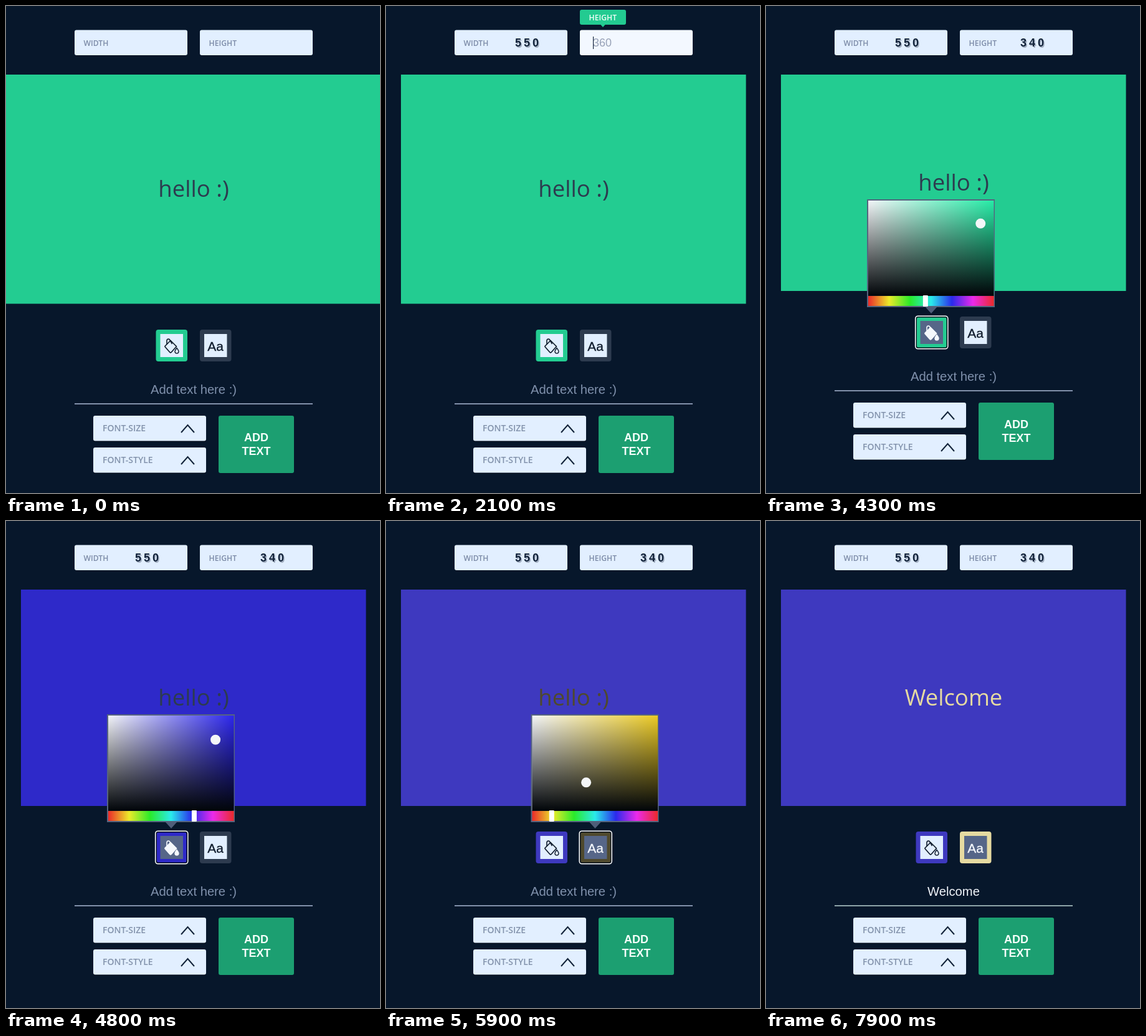
An HTML page that plays this animation: 600 px wide and 781 px high, repeating every 8000 ms.

```html
<!DOCTYPE html>
<html lang="en">
<head>
<meta charset="utf-8">
<title>Image editor demo</title>
<style>
  html, body { margin: 0; width: 100%; height: 100%; overflow: hidden; background: #07172b; }
  svg { display: block; width: 100vw; height: 100vh; }
  .ui { font-family: "Open Sans", "Noto Sans", sans-serif; font-weight: 600; }
  .arial { font-family: "Liberation Sans", Arial, sans-serif; }
  .title { font: 400 36.5px "Open Sans", "Noto Sans", sans-serif; text-anchor: middle; }
  .label { font-size: 12.2px; }
  .select { font-size: 14px; fill: #8292ab; }
  .value { font-size: 18px; font-weight: 700; letter-spacing: 4px; }
  .hint { font-size: 18px; fill: #99a3b8; }
  .entry { font-size: 20.2px; text-anchor: middle; }
  .add { font-size: 18px; font-weight: 700; fill: #f4fffa; text-anchor: middle; }
</style>
</head>
<body>
<svg id="stage" viewBox="0 0 600 781" preserveAspectRatio="none"></svg>
<script>
const LOOP = 8000;
const stage = document.getElementById('stage');
const clamp = v => Math.max(0, Math.min(1, v));
const mix = (a, b, p) => a + (b - a) * p;
const ramp = (t, from, to) => {
  const p = clamp((t - from) / (to - from));
  return p * p * (3 - 2 * p);
};
const pulse = (t, on, off, fade = 150) => ramp(t, on, on + fade) * (1 - ramp(t, off, off + fade));
const typed = (word, t, start, step) => word.slice(0, Math.max(0, Math.floor((t - start) / step) + 1));
const rgb = c => `rgb(${c.map(Math.round)})`;
const blend = (a, b, p) => rgb(a.map((v, i) => mix(v, b[i], p)));
const hsv = ([h, s, v]) => rgb([5, 3, 1].map(n => {
  const k = (n + h / 60) % 6;
  return 255 * v * (1 - s * Math.max(0, Math.min(k, 4 - k, 1)));
}));

// Moves hue first, then saturation and brightness, as the two handles are dragged.
const drag = (a, b, hueP, toneP) => [mix(a[0], b[0], hueP), mix(a[1], b[1], toneP), mix(a[2], b[2], toneP)];

const GREEN = [159, .83, .8], PURPLE = [242, .7, .75], SLATE = [216, .43, .31], CREAM = [50, .3, .9];

const field = (id, name, x, tagWidth) => `
  <g transform="translate(${x} 0)">
    <rect y="39" width="181" height="41" rx="3" fill="#030d1b"/>
    <rect id="${id}Box" y="38.5" width="181" height="40.5" rx="3"/>
    <g id="${id}Tag" fill="#23cb91">
      <rect y="6" width="${tagWidth}" height="24" rx="3"/>
      <path d="M${tagWidth / 2 - 4} 29.5h8l-4 4.5z"/>
    </g>
    <text id="${id}Label" class="ui label" x="14.5">${name}</text>
    <text id="${id}Hint" class="arial hint" x="21" y="65"></text>
    <g id="${id}Value" class="arial value">
      <text x="1.5" y="66.5" fill="#a3afc2"></text>
      <text y="65" fill="#12233a"></text>
    </g>
    <rect id="${id}Caret" y="49" width="1.2" height="20" fill="#1b2940"/>
  </g>`;

const select = (name, y) => `
  <rect x="140" y="${y + 1}" width="181" height="41" rx="3" fill="#030d1b"/>
  <rect x="140" y="${y}" width="181" height="40.5" rx="3" fill="#e2efff"/>
  <text class="ui select" x="155" y="${y + 25}">${name}</text>
  <path d="M281 ${y + 27}l10.5-12 10.5 12" fill="none" stroke="#12233a" stroke-width="2"/>`;

const swatch = (id, x, content) => `
  <g transform="translate(${x} 519)">
    <rect id="${id}Edge" width="50.5" height="51" rx="4"/>
    <g id="${id}Focus" fill="none" stroke-width="1.5">
      <rect x=".7" y=".7" width="49.1" height="49.6" rx="3" stroke="#07101c"/>
      <rect x="-.8" y="-.8" width="52.1" height="52.6" rx="4" stroke="#fff"/>
    </g>
    <rect id="${id}Face" x="7" y="7" width="36.5" height="37"/>
    <g id="${id}Ink">${content}</g>
  </g>`;

const bucket = `
  <path id="bucket" d="M17.5 23.5L23.5 17.5 33 27 24.5 36.5Q23.5 37.5 22.5 36.5L15 28Q14 27 15 26z"
    stroke-width="1.7" stroke-linejoin="round"/>
  <path d="M17.5 24V17a2.6 2.6 0 0 1 5 0l3.5 6" fill="none" stroke-width="1.6"/>
  <path id="drop" d="M33.5 29.5q3.2 4 3 5.6a3 3 0 0 1-6 0q0-1.6 3-5.6z" stroke-width="1.4"/>`;

const picker = (id, x) => `
  <g id="${id}" transform="translate(${x} 312)">
    <path d="M91 170h20l-10 11z" fill="#4f5d79"/>
    <rect x="-2" y="-2" width="205" height="173" fill="#56647f"/>
    <rect width="201.5" height="152" fill="url(#${id}Tone)"/>
    <rect width="201.5" height="152" fill="url(#shade)"/>
    <rect y="152" width="201.5" height="1" fill="#0a1018"/>
    <rect y="153" width="201.5" height="16" fill="url(#hues)"/>
    <rect id="${id}Hue" y="152" width="8" height="18" rx="1" fill="#fff"/>
    <circle id="${id}Dot" r="8" fill="#f4f6f8"/>
  </g>`;

const toneGradient = id => `<linearGradient id="${id}Tone">
  <stop stop-color="#f3f5f8"/><stop id="${id}Corner" offset="1"/></linearGradient>`;
const hueStops = Array.from({ length: 7 }, (_, i) =>
  `<stop offset="${i / 6}" stop-color="${hsv([i * 60, .82, .92])}"/>`).join('');

stage.innerHTML = `
  <defs>
    ${toneGradient('fillPick')}${toneGradient('textPick')}
    <linearGradient id="shade" x2="0" y2="1">
      <stop stop-color="#000" stop-opacity="0"/><stop offset="1" stop-color="#02060a"/>
    </linearGradient>
    <linearGradient id="hues">${hueStops}</linearGradient>
  </defs>
  <rect width="600" height="781" fill="#07172b"/>
  ${field('width', 'WIDTH', 110, 71)}
  ${field('height', 'HEIGHT', 311, 74)}
  <rect id="canvas" y="110"/>
  <text id="title" class="title" x="301"></text>
  <g id="panel">
    ${swatch('fill', 240.5, bucket)}
    ${swatch('text', 311, '<text class="arial" x="25" y="33.5" font-size="21" text-anchor="middle" stroke-width=".3">Aa</text>')}
    <text id="entry" class="arial entry" x="301" y="622"></text>
    <rect id="line" x="110" y="637" width="382" height="2"/>
    ${select('FONT-SIZE', 657)}
    ${select('FONT-STYLE', 708)}
    <rect x="341" y="657" width="121" height="92" rx="3" fill="#1c9f71"/>
    <text class="arial add" x="401.5" y="697.5">ADD</text>
    <text class="arial add" x="401.5" y="720">TEXT</text>
  </g>
  ${picker('fillPick', 164)}
  ${picker('textPick', 234.5)}`;

const el = {};
stage.querySelectorAll('[id]').forEach(node => el[node.id] = node);
const set = (id, attrs) => {
  for (const key in attrs) el[id].setAttribute(key, attrs[key]);
};

function drawField(id, t, focusAt, blurAt, hint, text) {
  const p = pulse(t, focusAt, blurAt);
  const focused = t >= focusAt && t < blurAt;
  set(id + 'Box', { fill: blend([226, 239, 255], [243, 248, 255], p) });
  set(id + 'Tag', { opacity: p });
  set(id + 'Label', { y: mix(63.5, 23, p), fill: blend([124, 139, 167], [240, 255, 248], p) });
  el[id + 'Hint'].textContent = focused && !text ? hint : '';
  set(id + 'Value', { transform: `translate(${focused ? 21.5 : 97} 0)` });
  for (const node of el[id + 'Value'].children) node.textContent = text;
  set(id + 'Caret', { x: 21 + 14 * text.length, opacity: focused ? 1 : 0 });
}

function drawPicker(id, color, opacity) {
  const [h, s, v] = color;
  set(id, { opacity, visibility: opacity > 0 ? 'visible' : 'hidden' });
  set(id + 'Corner', { 'stop-color': hsv([h, .84, .92]) });
  set(id + 'Hue', { x: (h + 9) / 1.8 - 5.5 });
  set(id + 'Dot', { cx: 234 * s - 14, cy: 8 + 144 * (1 - v) });
}

function drawSwatch(id, color, active, focused) {
  const ink = active ? '#f5f8fc' : '#101c2c';
  set(id + 'Edge', { fill: hsv(color) });
  set(id + 'Face', { fill: active ? '#566688' : '#e2efff' });
  set(id + 'Ink', { fill: ink, stroke: ink });
  set(id + 'Focus', { opacity: focused ? 1 : 0 });
}

function draw(t) {
  const narrow = t >= 1750, short = t >= 2650;
  const w = narrow ? 553.5 : 600, h = short ? 347 : 367.5;
  const fillColor = drag(GREEN, PURPLE, ramp(t, 4380, 4720), ramp(t, 4740, 4920));
  const textColor = drag(SLATE, CREAM, ramp(t, 5500, 5850), ramp(t, 5900, 6250));
  const message = typed('Welcome', t, 6900, 100);

  drawField('width', t, 950, 1950, '600', typed('550', t, 1540, 80));
  drawField('height', t, 1950, 3050, '360', typed('340', t, 2250, 170));

  set('canvas', { x: narrow ? 24 : 0, width: w, height: h, fill: hsv(fillColor) });
  set('title', { y: short ? 295.5 : 306, fill: hsv(textColor) });
  el.title.textContent = t >= 7700 ? 'Welcome' : 'hello :)';

  set('panel', { transform: `translate(0 ${short ? -21 : 0})` });
  const filling = t >= 3550 && t < 5050;
  drawSwatch('fill', fillColor, filling, filling);
  drawSwatch('text', textColor, t >= 5150, t >= 5150 && t < 6400);
  for (const id of ['bucket', 'drop']) set(id, { fill: filling ? '#f5f8fc' : 'none' });

  el.entry.textContent = message || 'Add text here :)';
  set('entry', { fill: message ? '#f1f5fa' : '#7f90ab' });
  set('line', { fill: message ? '#8fa5a9' : '#8291ab' });

  drawPicker('fillPick', fillColor, pulse(t, 3550, 4980));
  drawPicker('textPick', textColor, pulse(t, 5150, 6450, 180));
}

const start = performance.now();
function tick() {
  draw((performance.now() - start) % LOOP);
  requestAnimationFrame(tick);
}
tick();
</script>
</body>
</html>
```
